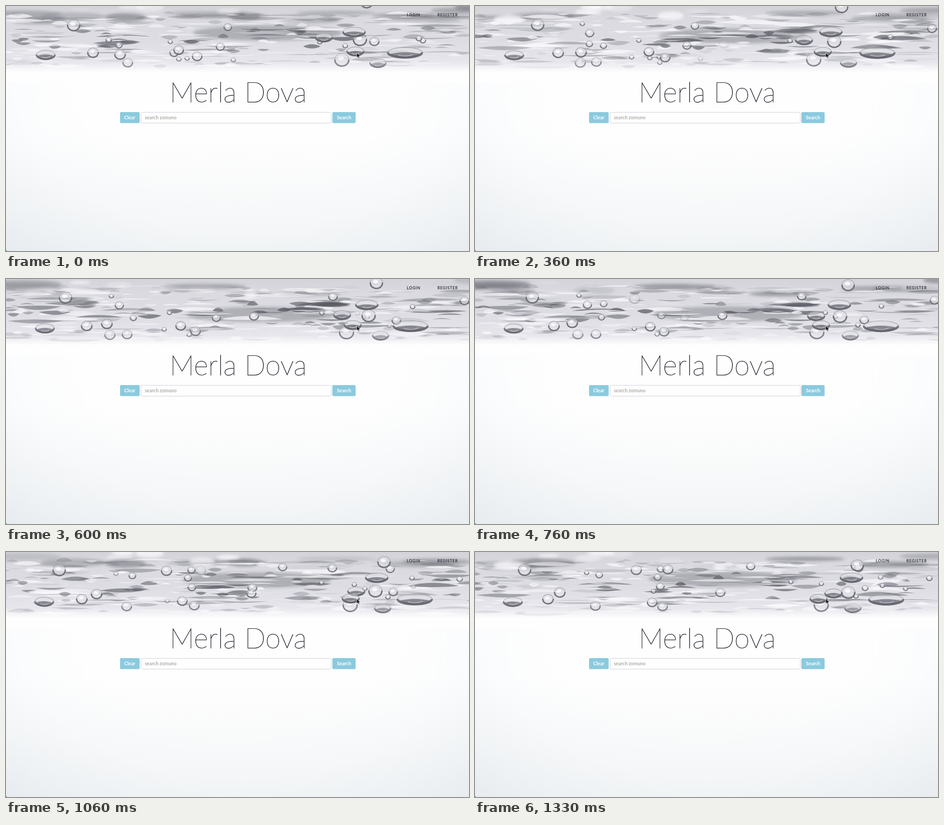
Animation of 1027x545 px, one loop 1.36 s. Source, as an HTML page with a canvas:

```html
<!DOCTYPE html>
<html lang="en">
<head>
<meta charset="utf-8">
<title>Search page</title>
<style>
  html, body { margin: 0; width: 100%; height: 100%; overflow: hidden; }
  body {
    position: relative;
    background:
      linear-gradient(rgba(222, 228, 231, 0) 52%, rgba(222, 228, 231, .3)),
      radial-gradient(ellipse 760px 520px at 520px 170px,
        #fefefe 0 45%, #fbfcfd 65%, #f4f6f8 85%, #e7ebee 108%);
  }
  canvas, svg { position: absolute; left: 0; top: 0; display: block; }
  canvas { filter: blur(.7px); }
  text { font-family: Lato, "Open Sans", sans-serif; font-weight: 700; }
  .title { font-size: 61.5px; font-weight: 100; fill: #34323b; stroke: #34323b; stroke-width: .75px; }
  .nav { font-size: 8.5px; letter-spacing: .8px; fill: #35343a; }
  .label { font-size: 10.6px; fill: #fff; text-anchor: middle; }
  .hint { font-size: 10.5px; fill: #adaca6; }
  .button { fill: #8bcade; }
</style>
</head>
<body>
<canvas id="water" width="1027" height="170"></canvas>
<svg width="1027" height="545" viewBox="0 0 1027 545">
  <text class="nav" x="889" y="23">LOGIN</text>
  <text class="nav" x="957" y="23">REGISTER</text>
  <text class="title" x="515" y="214" text-anchor="middle">Merla Dova</text>
  <rect class="button" x="253" y="236" width="43.5" height="24.5" rx="2.5"/>
  <text class="label" x="274.5" y="252">Clear</text>
  <rect x="299.5" y="236.5" width="422" height="24" rx="3" fill="#fefefe" stroke="#cfcfd3"/>
  <text class="hint" x="308" y="252">search zomuno</text>
  <rect class="button" x="724" y="236" width="51.5" height="24.5" rx="2.5"/>
  <text class="label" x="749.8" y="252">Search</text>
  <path d="M778 104v11l2.5-2.2 1.7 3.8 1.9-.8-1.7-3.7h3.5z" fill="#111" stroke="#fff" stroke-width=".7"/>
  <path d="M0 542.5V545H2.5Q.5 544.5 0 542.5" fill="#222"/>
</svg>
<script>
const LOOP = 1360, FRAMES = 41, W = 1027, H = 170, TAU = Math.PI * 2;
const ctx = document.getElementById('water').getContext('2d');

// The larger bubbles: x, y from and to, radius
const bubbles = [
  [150, 43, 110, 40, 15], [193, 104, 162, 105, 13], [253, 108, 188, 90, 13],
  [270, 126, 267, 120, 12], [383, 98, 393, 112, 12], [424, 112, 416, 121, 12],
  [705, 70, 795, 92, 20], [785, 75, 828, 90, 16], [772, 58, 835, 57, 26],
  [800, -8, 848, 30, 15], [745, 120, 768, 118, 17], [775, 101, 762, 104, 20],
  [825, 127, 838, 125, 19], [88, 109, 84, 111, 22], [885, 104, 912, 106, 40]
];

const clamp = v => Math.max(0, Math.min(1, v));
const mix = (a, b, k) => a + (b - a) * k;
const bump = (v, mid, width) => Math.exp(-(((v - mid) / width) ** 2));

function seeded(seed) {
  return () => {
    seed = (seed * 1664525 + 1013904223) >>> 0;
    return seed / 4294967296;
  };
}

function lens(x, y, w, h, bend, fill) {
  ctx.fillStyle = fill;
  ctx.beginPath();
  ctx.moveTo(x - w, y);
  ctx.quadraticCurveTo(x, y + bend - h, x + w, y);
  ctx.quadraticCurveTo(x, y + bend + h, x - w, y);
  ctx.fill();
}

function arc(x, y, rx, ry, from, to, width, color) {
  ctx.beginPath();
  ctx.ellipse(x, y, rx, ry, 0, from, to);
  ctx.lineWidth = width;
  ctx.strokeStyle = color;
  ctx.stroke();
}

function oval(x, y, rx, ry, fill) {
  ctx.beginPath();
  ctx.ellipse(x, y, rx, ry, 0, 0, TAU);
  ctx.fillStyle = fill;
  ctx.fill();
}

function verticalFill(y, h, stops) {
  const g = ctx.createLinearGradient(0, y, 0, y + h);
  stops.forEach(([at, color]) => g.addColorStop(at, color));
  ctx.fillStyle = g;
  ctx.fillRect(0, y, W, h);
}

// Out-of-focus bands above, and the dark mass of water in the middle
function backdrop(t) {
  const rnd = seeded(23);
  ctx.filter = 'blur(3px)';
  for (let i = 0; i < 26; i++) {
    const x = rnd() * W, y = rnd() * 36, w = 30 + 75 * rnd(), h = 3 + 7 * rnd();
    const a = clamp(.25 + .6 * Math.sin(rnd() * TAU + t * (5 + 7 * rnd())));
    const tone = i % 3 ? '108,108,117' : '253,253,255';
    oval(x, y, i % 3 ? w : w * .4, h, `rgba(${tone},${a * (i % 3 ? .65 : .9)})`);
  }
  const y = 60 + 20 * Math.sin(Math.PI * t) ** 4;
  oval(580 - 30 * t, y, 165, 17, 'rgba(112,112,122,.42)');
  ctx.filter = 'none';
}

// Ripples that come and go along the surface
function ripples(t) {
  const rnd = seeded(71);
  for (let i = 0; i < 520; i++) {
    const dark = i % 9 < 5;
    const y = 16 + 118 * rnd() + 4 * t, x = rnd() * W + (rnd() - .5) * 60 * t;
    const w = 12 + 58 * rnd() ** 2, h = 2 + 8 * rnd() ** 2, bend = (rnd() - .5) * 12;
    const beat = Math.sin(rnd() * TAU + t * (5 + 8 * rnd()));
    const depth = .25 + .75 * bump(y, 74, 34) * (.6 + .4 * bump(x, 560, 330));
    const a = clamp(.3 + .8 * beat) * (dark ? .78 * depth : .72);
    if (a > .02) lens(x, y, w, h, bend, `rgba(${dark ? '88,88,98' : '250,250,253'},${a})`);
  }
}

// Small ones are round rings, large ones flatten into shallow cups
function bubble(x, y, r, alpha) {
  const flat = r > 17, ry = flat ? 9 + r * .1 : r * .9, thick = 2 + r * .08;
  ctx.globalAlpha = alpha * (1 - .5 * clamp((y - 105) / 35));
  oval(x, y, r, ry, 'rgba(222,222,228,.55)');
  arc(x, y, r - 1, ry - 1, 0, TAU, 1.3, 'rgba(110,110,120,.5)');
  arc(x, y, r - thick / 2, ry - thick / 2, -.1, Math.PI + .1, thick, 'rgba(84,84,94,.72)');
  if (flat) lens(x, y + ry * .25, r * .9, ry * 1.1, ry * .4, 'rgba(98,98,108,.7)');
  else oval(x - r * .1, y - ry * .25, r * .4, ry * .28, 'rgba(253,253,255,.85)');
  arc(x, y, r * .5, ry * .55, .5, 2.4, 1.2, 'rgba(240,240,245,.7)');
  ctx.globalAlpha = 1;
}

function smallBubbles(t) {
  const rnd = seeded(9);
  for (let i = 0; i < 44; i++) {
    const x = mix(225, 1020, rnd()) + (rnd() - .5) * 50 * t;
    const y = 40 + 90 * rnd() - 10 * t, r = 6 + 7 * rnd() ** 2;
    const age = t - mix(-.5, 1, rnd());
    const alpha = clamp(age / .06) * clamp((.65 - age) / .06);
    if (alpha) bubble(x, y, r, alpha * .9);
  }
}

function draw(t) {
  ctx.clearRect(0, 0, W, H);
  verticalFill(0, 148, [[0, '#d3d3d9'], [.22, '#dadae0'], [.5, '#dcdce2'],
    [.75, '#e3e3e9'], [1, '#ececf1']]);
  backdrop(t);
  ripples(t);
  verticalFill(126, 44, [[0, 'rgba(254,254,254,0)'], [.2, 'rgba(254,254,254,.4)'],
    [.5, '#fefefe'], [1, '#fefefe']]);
  smallBubbles(t);
  for (const [x, y, x2, y2, r] of bubbles) bubble(mix(x, x2, t), mix(y, y2, t), r, 1);
}

// Thirty pictures a second, on a 10 ms clock
function step(ms) {
  const rest = ms % 100;
  return 3 * Math.floor(ms / 100) + (rest >= 30) + (rest >= 60);
}

let shown = -1;
function tick() {
  const n = step(performance.now() % LOOP);
  if (n !== shown) draw((shown = n) / (FRAMES - 1));
  requestAnimationFrame(tick);
}
tick();
</script>
</body>
</html>
```
